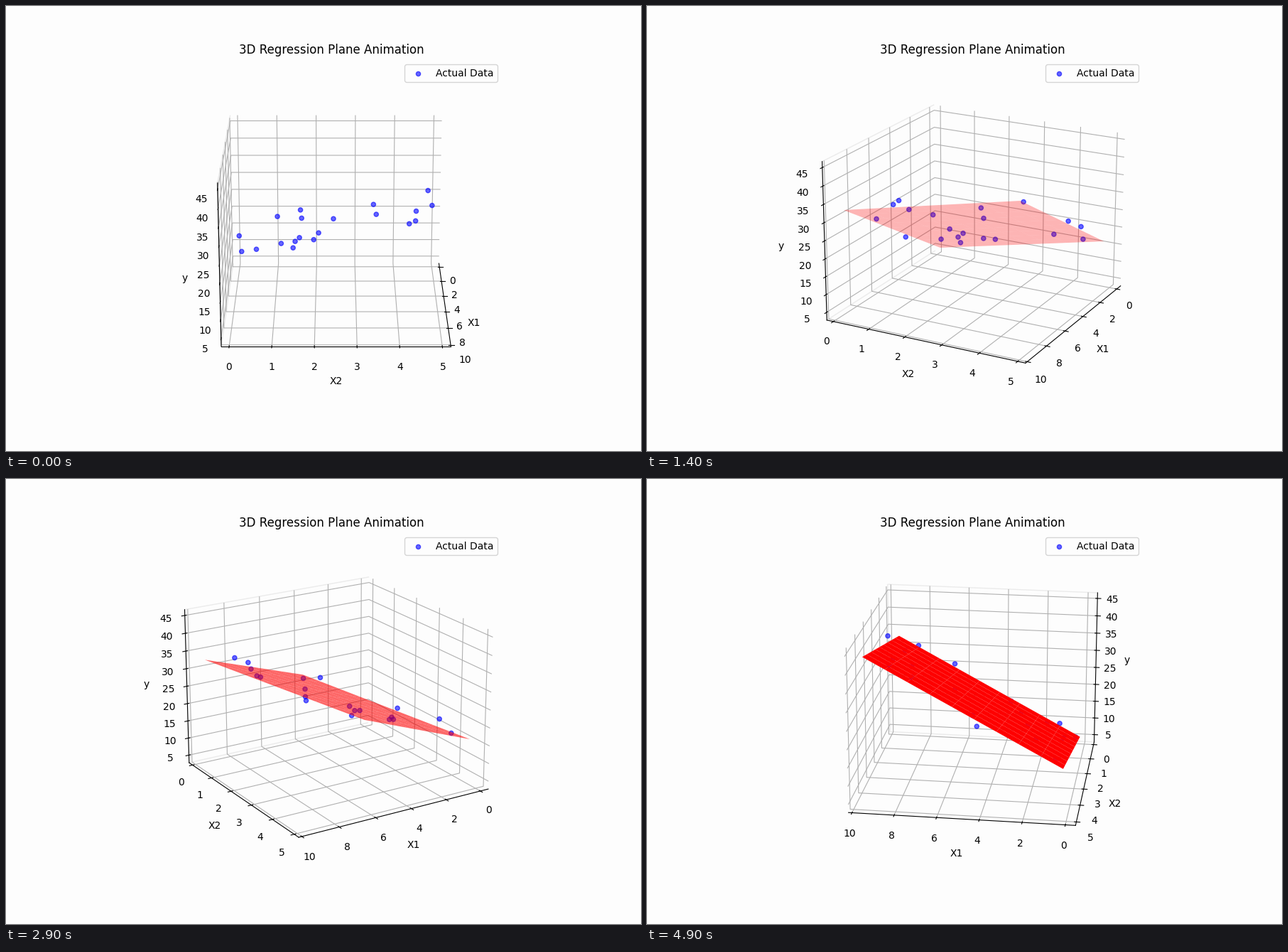
Write a matplotlib script that moves like this. It is 894 by 626 pixels and loops after 5 s.

```python
import numpy as np
import matplotlib.pyplot as plt
from matplotlib.animation import FuncAnimation

FRAMES = 50
BACKGROUND = "#fdfdfd"

plt.rcParams.update({
    "figure.facecolor": BACKGROUND,
    "axes.facecolor": BACKGROUND,
})


def make_samples(count=100, seed=42):
    rng = np.random.RandomState(seed)
    x1 = rng.rand(count) * 10
    x2 = rng.rand(count) * 5
    y = 5 + 3 * x1 + 2 * x2 + 2 * rng.randn(count)
    return x1, x2, y


def fit_plane(x1, x2, y):
    design = np.column_stack([np.ones_like(x1), x1, x2])
    return np.linalg.lstsq(design, y, rcond=None)[0]


x1, x2, y = make_samples()
order = np.random.RandomState(42).permutation(len(y))
test, train = order[:20], order[20:]
intercept, slope1, slope2 = fit_plane(x1[train], x2[train], y[train])


def span(values, steps=10):
    return np.linspace(values.min(), values.max(), steps)


grid1, grid2 = np.meshgrid(span(x1[test]), span(x2[test]))
grid_y = intercept + slope1 * grid1 + slope2 * grid2

fig = plt.figure(figsize=(8.94, 6.26), dpi=100)
ax = fig.add_subplot(111, projection="3d")


def style_panes():
    # Clear panes, with a faint outline on the X2 wall only.
    for axis in (ax.xaxis, ax.yaxis, ax.zaxis):
        axis.pane.set_alpha(None)
        axis.pane.set_facecolor("none")
        axis.pane.set_edgecolor("none")
    ax.yaxis.pane.set_edgecolor("#ebebeb")


def update(frame):
    ax.clear()
    style_panes()
    ax.scatter(x1[test], x2[test], y[test], color="blue", alpha=0.6,
               label="Actual Data")
    ax.plot_surface(grid1, grid2, grid_y, color="red",
                    alpha=frame / (FRAMES - 1))
    ax.set_xlabel("X1")
    ax.set_ylabel("X2")
    ax.set_zlabel("y")
    ax.set_title("3D Regression Plane Animation")
    ax.legend(loc="upper right")
    ax.view_init(elev=20, azim=2 * frame)
    return []


animation = FuncAnimation(fig, update, frames=FRAMES, interval=100,
                          repeat=True, repeat_delay=0)
plt.show()
```
